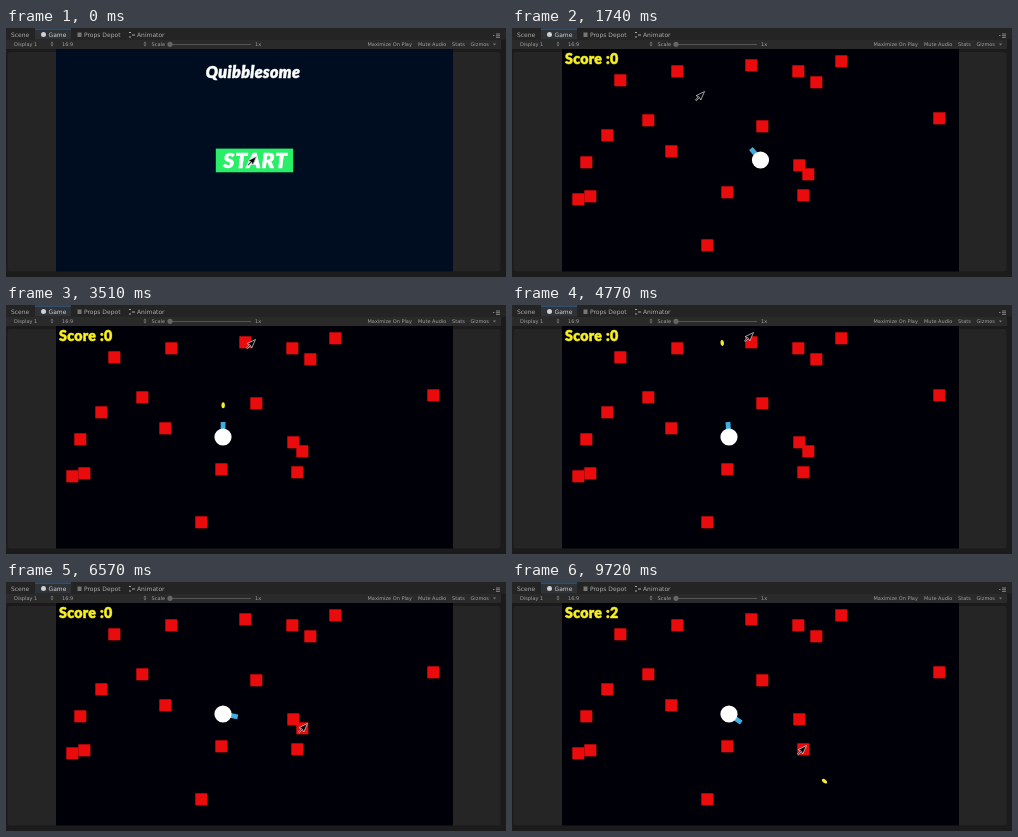
These frames come from a looping animation (500x249 px, 9.75 s). An HTML page:

```html
<!DOCTYPE html>
<html lang="en">
<head>
<meta charset="utf-8">
<title>Arena shooter</title>
<style>
  html, body { margin: 0; width: 100%; height: 100%; overflow: hidden; background: #1c1c1c; }
  svg { display: block; width: 500px; height: 249px; }
  .tab { font: 6px "DejaVu Sans", sans-serif; fill: #aaa; }
  .tool { font: 5px "DejaVu Sans", sans-serif; fill: #a0a0a0; }
  .show { font-family: Lato, "Open Sans", sans-serif; font-weight: 900; stroke-width: .5; }
  .white { font-style: italic; fill: #fff; stroke: #fff; text-anchor: middle; }
  #score { font-size: 14.2px; letter-spacing: .3px; fill: #f8f020; stroke: #f8f020; }
</style>
</head>
<body>
<svg viewBox="0 0 500 249">
  <defs>
    <clipPath id="view"><rect x="50" y="21" width="397" height="222.5"/></clipPath>
  </defs>

  <rect width="500" height="249" fill="#1b1b1b"/>
  <rect width="500" height="11.5" fill="#242424"/>
  <rect x="29" width="36" height="11.5" fill="#2f3236"/>
  <rect x="29" y=".6" width="36" height="1" fill="#33608f"/>
  <rect y="11.5" width="495" height="9.5" fill="#2a2a2a"/>
  <rect x="1.5" y="24" width="493" height="219.5" rx="3" fill="#252525"/>

  <g class="tab">
    <text x="5" y="9">Scene</text>
    <text x="42.5" y="9" fill="#d0d0d0">Game</text>
    <text x="78" y="9">Props Depot</text>
    <text x="131" y="9">Animator</text>
  </g>
  <circle cx="37.5" cy="6.5" r="2.5" fill="#d0d0d0"/>
  <rect x="71.5" y="4.5" width="4" height="4.5" fill="#777"/>
  <path d="M123 4.5h2M126 7h3M123 9h2" stroke="#aaa" stroke-width="1.2"/>
  <path d="M487 7.5h1.5M490 6h4M490 7.7h4M490 9.4h4" stroke="#999" stroke-width=".8"/>

  <g class="tool">
    <text x="8" y="18">Display 1</text>
    <text x="56" y="18">16:9</text>
    <text x="145.5" y="18">Scale</text>
    <text x="249" y="18">1x</text>
    <text x="361.5" y="18">Maximize On Play</text>
    <text x="412" y="18">Mute Audio</text>
    <text x="446" y="18">Stats</text>
    <text x="464.5" y="18">Gizmos</text>
  </g>
  <path d="M44.5 15.5l1.5-2 1.5 2zm0 1l1.5 2 1.5-2zM137.5 15.5l1.5-2 1.5 2zm0 1l1.5 2 1.5-2zM487 15.5h3l-1.5 2z" fill="#777"/>
  <path d="M162 16.5h83" stroke="#555" stroke-width="1"/>
  <circle cx="164" cy="16.3" r="2.6" fill="#666"/>

  <g clip-path="url(#view)">
    <g id="menu">
      <rect x="50" y="21" width="397" height="223" fill="#000d20"/>
      <text class="show white" x="247" y="50" font-size="16" letter-spacing=".4">Quibblesome</text>
      <rect id="button" x="209.8" y="120.6" width="77.4" height="23.7"/>
      <text class="show white" x="249.5" y="139.5" font-size="21.3" letter-spacing=".7">START</text>
    </g>
    <g id="game">
      <rect x="50" y="21" width="397" height="223" fill="#000008"/>
      <g id="blocks" fill="#ea0c0c"></g>
      <g id="shots" fill="#f6ee22"></g>
      <g id="player">
        <rect id="gun" x="6" y="-2.4" width="9" height="4.8" fill="#42aee0"/>
        <circle r="8.6" fill="#fff"/>
      </g>
      <text id="score" class="show" x="53" y="35.7"></text>
    </g>
    <path id="cursor" d="M4.5-4.5L-4-.3-1.4.6-4.5 4-3.6 4.8-.6 1.4.8 4Z"
          fill="#05050a" stroke="#d0d0d0" stroke-width=".75" stroke-linejoin="round"/>
  </g>
</svg>

<script>
const LOOP = 9750, CLICK = 450, CUT = 540, RESPAWN = 9000;
const MOVE = 360, SHOT_GAP = 410, HIT_FLIGHT = 205;
const SPEED = 0.25, MUZZLE = 14, BLOCK = 12;
const CENTER = { x: 248.5, y: 132 };

// Each move: start time, then where it eases to.
const cursorMoves = [
  [0, 246, 133], [CLICK, 252, 136], [1380, 188, 68], [1890, 200, 50], [2850, 245, 39],
  [3750, 237, 32], [4860, 248, 34], [5880, 297, 146], [7800, 290, 168]
];
const playerMoves = [[0, CENTER.x], [2850, 217]];

const burst = (start, count) => Array.from({ length: count }, (_, i) => start + i * SHOT_GAP);
const killers = burst(6830, 2);
const shotTimes = [...burst(3440, 2), ...burst(4450, 3), ...killers, ...burst(8490, 3)];
const hits = killers.map(start => start + HIT_FLIGHT);

// The last two blocks are the ones that get hit.
const blockSpots = [
  [108, 52], [165, 43], [239, 37], [286, 43], [304, 54], [329, 33], [427, 90],
  [136, 92], [95, 107], [159, 123], [250, 98], [74, 134], [78, 168], [66, 171],
  [291, 167], [215, 164], [195, 217], [287, 137], [296, 146]
];

const el = id => document.getElementById(id);
const [menu, button, game, player, gun, score, cursor] =
  ["menu", "button", "game", "player", "gun", "score", "cursor"].map(el);

function add(parent, name, attrs) {
  const node = document.createElementNS("http://www.w3.org/2000/svg", name);
  for (const key in attrs) node.setAttribute(key, attrs[key]);
  return el(parent).appendChild(node);
}
const show = (node, on) => node.setAttribute("visibility", on ? "inherit" : "hidden");
const place = (node, x, y, turn = 0) =>
  node.setAttribute("transform", `translate(${x} ${y}) rotate(${turn})`);

function follow(moves, t) {
  return moves.reduce((from, [start, ...to]) => {
    const p = Math.min(1, Math.max(0, (t - start) / MOVE));
    const e = p * p * (3 - 2 * p);
    return from ? from.map((v, i) => v + (to[i] - v) * e) : to;
  }, null);
}

// The gun aims from the middle of the view, wherever the player stands.
function aim(t) {
  const [x, y] = follow(cursorMoves, t);
  return Math.atan2(y - 4 - CENTER.y, x + 4 - CENTER.x);
}
const degrees = a => a * 180 / Math.PI;

const blocks = blockSpots.map(([x, y]) => add("blocks", "rect",
  { x: x + 0.3 - BLOCK / 2, y: y + 0.3 - BLOCK / 2, width: BLOCK, height: BLOCK }));
const [nearBlock, farBlock] = blocks.slice(-2);

const shots = shotTimes.map(start => ({
  start,
  end: killers.includes(start) ? start + HIT_FLIGHT : LOOP,
  angle: aim(start),
  x: follow(playerMoves, start)[0],
  node: add("shots", "ellipse", { rx: 3, ry: 1.7 })
}));

function draw(t) {
  const playing = t >= CUT;
  show(menu, !playing);
  show(game, playing);
  button.setAttribute("fill", t < CLICK ? "#29ee68" : "#20ba51");
  place(cursor, ...follow(cursorMoves, t));
  place(player, follow(playerMoves, t)[0], CENTER.y);
  place(gun, 0, 0, degrees(aim(t)));
  show(nearBlock, t < hits[0] || t >= RESPAWN);
  show(farBlock, t < hits[1]);
  score.textContent = "Score :" + hits.filter(hit => t >= hit).length;
  for (const s of shots) {
    const d = MUZZLE + SPEED * (t - s.start);
    show(s.node, t >= s.start && t < s.end);
    place(s.node, s.x + d * Math.cos(s.angle), CENTER.y + d * Math.sin(s.angle), degrees(s.angle));
  }
}

const begin = performance.now();
function tick() {
  draw((performance.now() - begin) % LOOP);
  requestAnimationFrame(tick);
}
tick();
</script>
</body>
</html>
```
